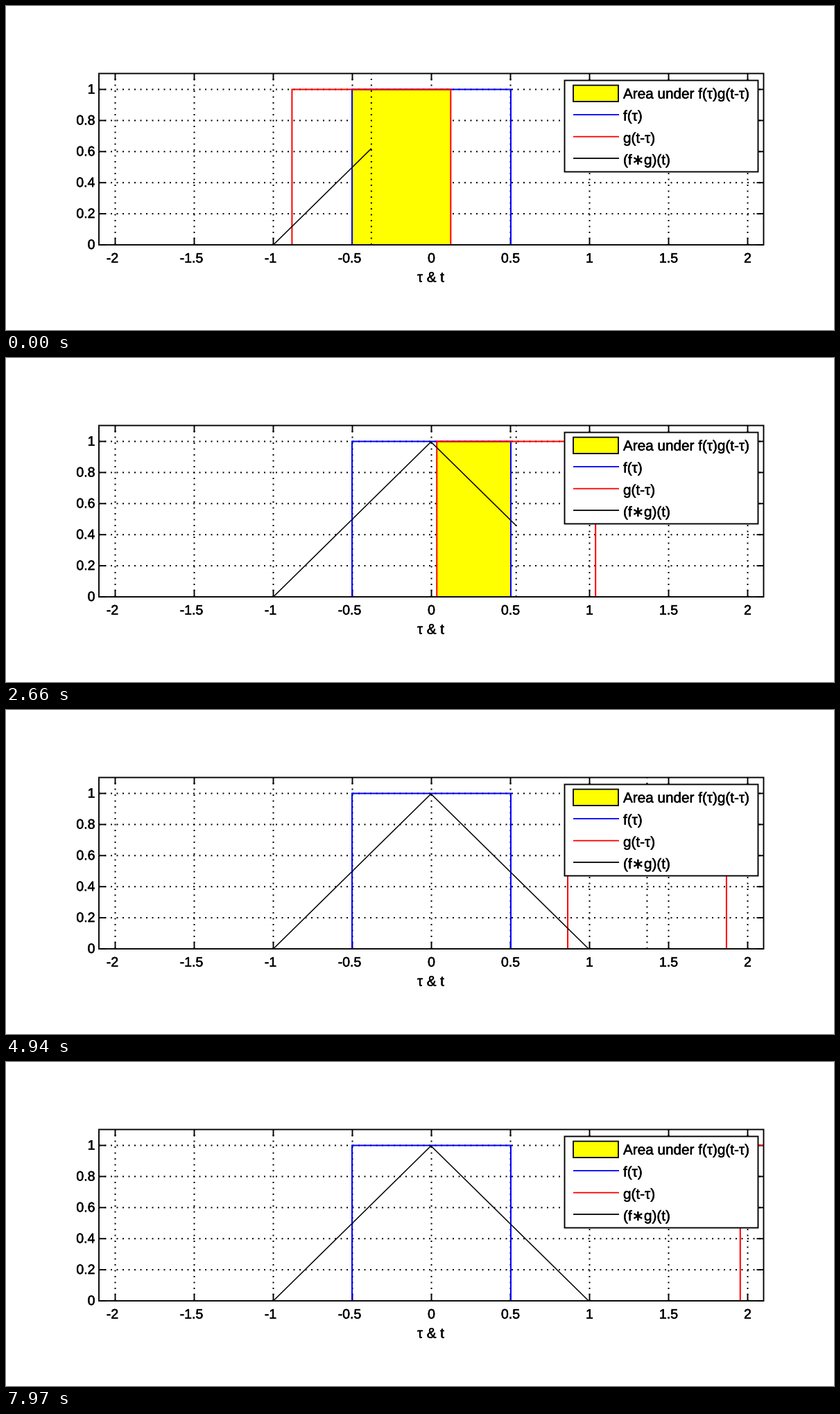
A matplotlib script that plays this animation: 1194 px wide and 468 px high, repeating every 8 s.

```python
import numpy as np
import matplotlib
import matplotlib.pyplot as plt
from matplotlib.animation import FuncAnimation
from matplotlib.patches import Rectangle
from matplotlib.patheffects import withStroke

W, H, DPI = 1194, 468, 100
FRAMES, INTERVAL = 200, 40
LEFT, RIGHT, TOP, BOTTOM = 134, 1092.5, 97.5, 345
BLACK, BLUE, RED, YELLOW = "#000000", "#0000ff", "#ff0000", "#ffff00"
HALF = 0.502          # half the width of each box
PEAK, END = -0.003, 0.994   # top and right foot of the result curve

# Shift of the moving box: a near-constant speed after a short hold
KEY_FRAMES = [1, 20, 44, 66, 100, 149, 199]
KEY_SHIFTS = [-0.38, -0.117, 0.22, 0.536, 1.041, 1.729, 2.455]

matplotlib.rcParams["font.family"] = ["Liberation Sans", "DejaVu Sans"]


def pt(px):
    return px * 72 / DPI


def px_x(v):
    return 613.5 + 228 * np.asarray(v, dtype=float)


def px_y(v):
    return 345 - 224.5 * np.asarray(v, dtype=float)


fig = plt.figure(figsize=(W / DPI, H / DPI), dpi=DPI, facecolor="white")
ax = fig.add_axes([0, 0, 1, 1])
ax.set_xlim(0, W)
ax.set_ylim(H, 0)
ax.axis("off")
frame = Rectangle((LEFT, TOP), RIGHT - LEFT, BOTTOM - TOP, fill=False,
                  ec=BLACK, lw=pt(1.9), zorder=7, joinstyle="miter",
                  snap=False)
ax.add_patch(frame)


def line(xs, ys, color=BLACK, width=1.9, z=1, clip=False, **style):
    art, = ax.plot(xs, ys, color=color, lw=pt(width), zorder=z, snap=False,
                   solid_capstyle="butt", solid_joinstyle="miter", **style)
    if clip:
        art.set_clip_path(frame)
    return art


def dotted(xs, ys, z=1, clip=False):
    return line(xs, ys, BLACK, 2, z, clip,
                linestyle=(0, (1, 3.25)), dash_capstyle="butt")


def label(x, y, text, size=19.5, ha="center", z=1):
    ax.text(x, y, text, fontsize=pt(size), ha=ha, va="center_baseline",
            color=BLACK, zorder=z,
            path_effects=[withStroke(linewidth=pt(0.5), foreground=BLACK)])


def draw_axes():
    tick = 10
    for v in np.arange(-2, 2.1, 0.5):
        x = px_x(v)
        dotted([x, x], [BOTTOM, TOP])
        line([x, x], [BOTTOM, BOTTOM - tick])
        line([x, x], [TOP, TOP + tick])
        label(x - (4 if v < 0 else 0), 364, f"{v:g}")
    for v in np.arange(6) / 5:
        y = px_y(v)
        if v > 0:
            dotted([LEFT, RIGHT], [y, y])
        line([LEFT, LEFT + tick], [y, y])
        line([RIGHT, RIGHT - tick], [y, y])
        label(128.5, y - 0.5, f"{v:g}", ha="right")
    label(612.5, 391, "τ & t", 20.5)


def draw_legend():
    z = 10
    ax.add_patch(Rectangle((805.5, 107.5), 279, 132, fc="white", ec=BLACK,
                           lw=pt(1.9), zorder=z, snap=False))
    ax.add_patch(Rectangle((818, 114.5), 65, 23.5, fc=YELLOW, ec=BLACK,
                           lw=pt(1.8), zorder=z + 1, snap=False))
    for y, color in ((157, BLUE), (188.7, RED), (220, BLACK)):
        line([818, 884], [y, y], color, 1.8, z + 1)
    names = ("Area under f(τ)g(t-τ)", "f(τ)", "g(t-τ)", "(f∗g)(t)")
    for y, name in zip((126, 158, 190, 221.5), names):
        label(890, y, name, 20.7, "left", z + 1)


def box(center):
    a, b = center - HALF, center + HALF
    return px_x([a, a, b, b]), px_y([0, 1, 1, 0])


draw_axes()
draw_legend()
line(*box(0), BLUE, 2, 3, clip=True)
area = Rectangle((0, px_y(1)), 0, BOTTOM - px_y(1), fc=YELLOW, lw=0, zorder=2)
ax.add_patch(area)
moving = line([], [], RED, 2, 4, clip=True)
cursor = dotted([], [], 5, clip=True)
result = line([], [], BLACK, 1.5, 6, clip=True)


def update(i):
    t = np.interp(i, KEY_FRAMES, KEY_SHIFTS)
    lo, hi = px_x(max(-HALF, t - HALF)), px_x(min(HALF, t + HALF))
    area.set_x(lo)
    area.set_width(max(0, hi - lo))
    area.set_visible(hi > lo)
    moving.set_data(*box(t))
    cursor.set_data([px_x(t)] * 2, [BOTTOM, TOP])
    s = np.array([-1] + [v for v in (PEAK, END) if v < t] + [min(t, 2.1)])
    result.set_data(px_x(s), px_y(np.maximum(0, np.minimum(1 + s, END - s))))
    return area, moving, cursor, result


anim = FuncAnimation(fig, update, frames=FRAMES, interval=INTERVAL,
                     init_func=lambda: update(0), repeat=True,
                     repeat_delay=0, blit=False)
plt.show()
```
